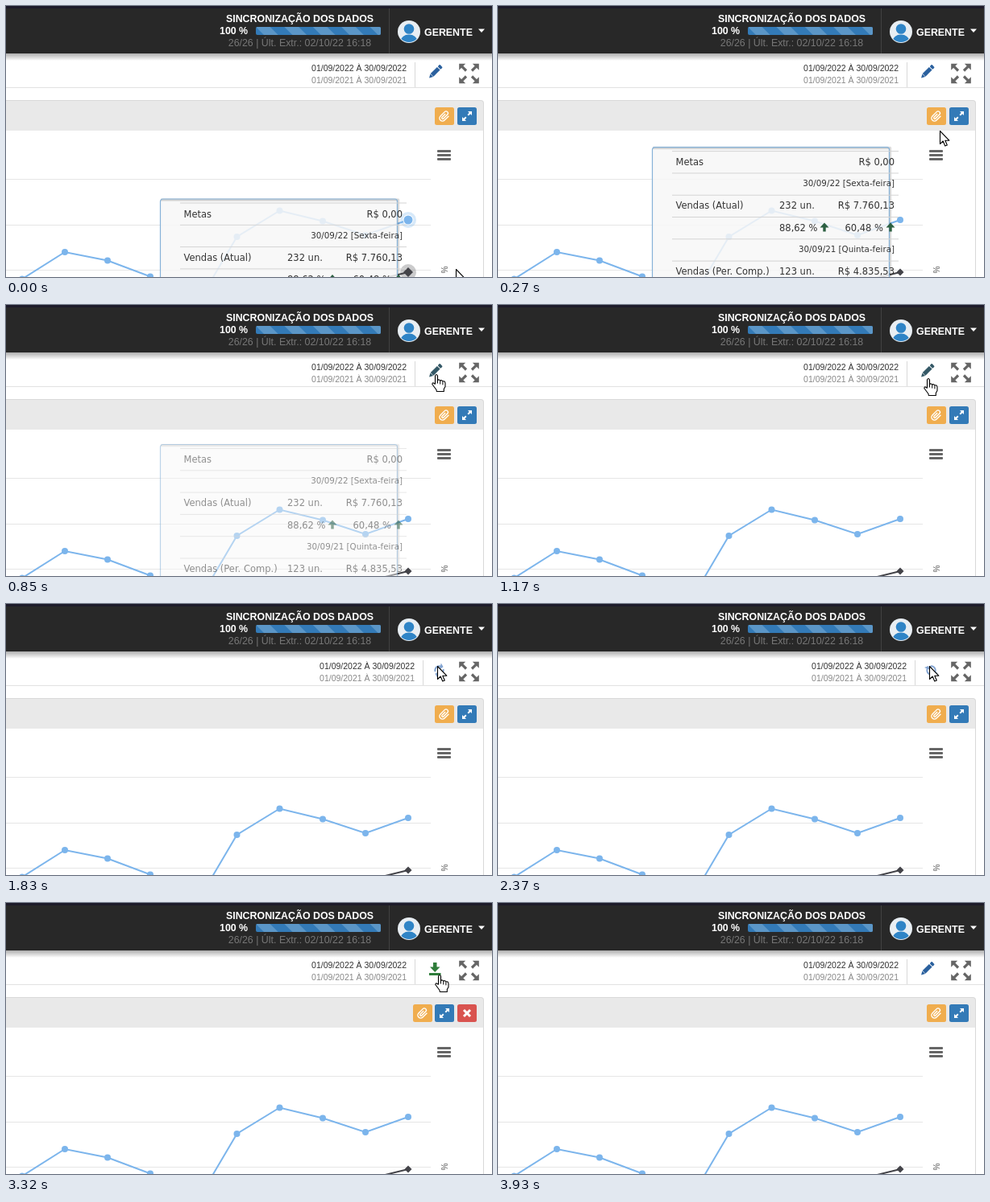
An HTML page with a canvas that plays this animation: 603x337 px, repeating every 4.48 s.

```html
<!DOCTYPE html>
<html lang="pt">
<head>
<meta charset="utf-8">
<style>
html, body { margin: 0; width: 100%; height: 100%; overflow: hidden; background: #fff; }
canvas { display: block; }
</style>
</head>
<body>
<canvas id="stage" width="603" height="337"></canvas>
<script>
const ctx = document.getElementById('stage').getContext('2d');
const LOOP = 4480;
const ARIAL = '"Liberation Sans", Arial, sans-serif';
const DEJAVU = '"DejaVu Sans", sans-serif';
const BLUE = '#7cb5ec', DARK = '#434348';

const CURSOR_PATH = [
  [70, 558, 327], [270, 548, 155], [520, 534, 87], [850, 534, 86],
  [1110, 534, 91], [1430, 534, 91], [1500, 535, 77], [2710, 535, 77],
  [2800, 538, 81], [2970, 538, 81], [3300, 538, 89]
];
const SALES = [[20, 339.5], [73, 306], [126, 316.5], [179, 336.5], [233, 378],
  [286.5, 287], [339.5, 254.5], [393, 267.5], [446, 285], [499, 266]];

const clamp = v => Math.max(0, Math.min(1, v));
const progress = (t, from, to) => clamp((t - from) / (to - from));
const between = (t, a, b) => t >= a && t < b;
const mix = (a, b, k) => `rgb(${a.map((v, i) => Math.round(v + (b[i] - v) * k))})`;

function rect(x, y, w, h, color) {
  ctx.fillStyle = color;
  ctx.fillRect(x, y, w, h);
}

function rounded(x, y, w, h, r, color) {
  ctx.fillStyle = color;
  ctx.beginPath();
  ctx.roundRect(x, y, w, h, r);
  ctx.fill();
}

function text(str, x, y, size, color, { family = ARIAL, weight = 400, align = 'left' } = {}) {
  ctx.font = `${weight} ${size}px ${family}`;
  ctx.textAlign = align;
  ctx.fillStyle = color;
  ctx.fillText(str, x, y);
}

function trace(points, close) {
  ctx.beginPath();
  points.forEach(([x, y]) => ctx.lineTo(x, y));
  if (close) ctx.closePath();
}

function polygon(points, color) {
  trace(points, true);
  ctx.fillStyle = color;
  ctx.fill();
}

function polyline(points, color, width) {
  trace(points, false);
  ctx.strokeStyle = color;
  ctx.lineWidth = width;
  ctx.stroke();
}

function disc(x, y, r, color) {
  ctx.fillStyle = color;
  ctx.beginPath();
  ctx.arc(x, y, r, 0, 7);
  ctx.fill();
}

function at(x, y, angle, draw) {
  ctx.save();
  ctx.translate(x, y);
  ctx.rotate(angle);
  draw();
  ctx.restore();
}

// Arrow from near the centre to the corner lying in direction (dx, dy)
function cornerArrow(cx, cy, dx, dy, gap, size, head, width, color) {
  const p = (a, b) => [cx + dx * a, cy + dy * b];
  polyline([p(gap, gap), p(size - head / 3, size - head / 3)], color, width);
  polygon([p(size, size), p(size - head, size), p(size, size - head)], color);
}

function header() {
  rect(0, 0, 603, 59, '#282828');
  rect(0, 0, 603, 3, '#1d1b2a');
  const shade = ctx.createLinearGradient(0, 59, 0, 68);
  shade.addColorStop(0, 'rgba(0,0,0,.32)');
  shade.addColorStop(1, 'rgba(0,0,0,0)');
  rect(0, 59, 603, 9, shade);
  rect(475, 3, 1, 56, '#414141');

  text('SINCRONIZAÇÃO DOS DADOS', 364.5, 20, 12.4, '#fff', { weight: 700, align: 'center' });
  text('100 %', 265, 35, 12.4, '#fff', { weight: 700 });
  text('26/26 | Últ. Extr.: 02/10/22 16:18', 364.5, 50, 12.4, '#777', { align: 'center' });

  ctx.save();
  ctx.beginPath();
  ctx.roundRect(310, 26, 155, 10, 2);
  ctx.clip();
  rect(310, 26, 155, 10, '#337ab7');
  for (let x = 310; x < 470; x += 35.4) {
    polygon([[x, 26], [x + 17.7, 26], [x + 27.7, 36], [x + 10, 36]], '#5b96c7');
  }
  ctx.restore();

  ctx.save();
  disc(500, 32, 14, '#e8eef3');
  ctx.beginPath();
  ctx.arc(500, 32, 13, 0, 7);
  ctx.clip();
  disc(500, 28.5, 6.3, '#2f84c6');
  ctx.beginPath();
  ctx.ellipse(500, 44, 10.5, 8.5, 0, 0, 7);
  ctx.fill();
  ctx.restore();
  text('GERENTE', 519, 37, 12.4, '#fff', { weight: 700 });
  polygon([[586, 28.5], [594, 28.5], [590, 33]], '#fff');
}

function pencil(color) {
  at(532.5, 82, -Math.PI / 4, () => {
    rect(-5.5, -2.6, 11.5, 5.2, color);
    polygon([[-6, -2.6], [-10.5, 0], [-6, 2.6]], color);
    rounded(7, -2.6, 3.6, 5.2, 1, color);
  });
}

function download(k) {
  rect(530, 74, 4.5, 6, mix([112, 70, 50], [47, 125, 59], k));
  polygon([[526, 79.5], [538.5, 79.5], [532.2, 86]], mix([70, 95, 55], [47, 125, 59], k));
  rect(525, 87, 14.5, 3, '#2f7d3b');
}

function spinner(t) {
  at(537.5, 82.5, t / 2000 * Math.PI * 2, () => {
    for (const turn of [0, Math.PI]) at(0, 0, turn, () => {
      ctx.strokeStyle = '#84a5d2';
      ctx.lineWidth = 2;
      ctx.beginPath();
      ctx.arc(0, 0, 5.2, Math.PI * 1.08, Math.PI * 1.8);
      ctx.stroke();
      polygon([[6.5, -6.5], [6.5, -1], [1, -1]], '#84a5d2');
    });
  });
}

function toolbar(t, loading, editing) {
  const right = loading ? 507 : 497;
  text('01/09/2022 À 30/09/2022', right, 81, 10.5, '#333', { align: 'right' });
  text('01/09/2021 À 30/09/2021', right, 96, 10.5, '#888', { align: 'right' });
  rect(right + 10, 70, 1, 31, '#d8d8d8');
  rect(0, 101, 603, 1, '#e2e2e2');

  if (loading) spinner(t);
  else if (editing) download(progress(t, 2830, 3200));
  else pencil(mix([42, 96, 158], [52, 88, 102], t < 1700 ? progress(t, 520, 850) : 0));

  for (const dx of [-1, 1]) for (const dy of [-1, 1]) {
    cornerArrow(574.5, 84, dx, dy, 3.5, 12.3, 8, 3.2, '#666');
  }
}

function button(x, color, icon) {
  rounded(x, 126, 24, 22, 2.5, color);
  icon(x + 12, 137);
}

function clipIcon(x, y) {
  at(x, y, -Math.PI / 4, () => {
    ctx.strokeStyle = '#fff';
    ctx.lineWidth = 1.4;
    ctx.beginPath();
    ctx.moveTo(4, 3.6);
    ctx.lineTo(-3.5, 3.6);
    ctx.arc(-3.5, 0, 3.6, Math.PI / 2, Math.PI * 1.5);
    ctx.lineTo(4, -3.6);
    ctx.arc(4, -1.2, 2.4, -Math.PI / 2, Math.PI / 2);
    ctx.lineTo(-3, 1.2);
    ctx.arc(-3, 0, 1.2, Math.PI / 2, Math.PI * 1.5);
    ctx.lineTo(3, -1.2);
    ctx.stroke();
  });
}

function expandIcon(x, y) {
  cornerArrow(x, y, 1, -1, 1.2, 6, 5, 2, '#fff');
  cornerArrow(x, y, -1, 1, 1.2, 6, 5, 2, '#fff');
}

function crossIcon(x, y) {
  polyline([[x - 4, y - 4], [x + 4, y + 4]], '#fff', 3);
  polyline([[x - 4, y + 4], [x + 4, y - 4]], '#fff', 3);
}

function panel(closable) {
  rounded(-10, 117, 603, 240, 4, '#d9d9d9');
  rounded(-10, 118, 602, 240, 3, '#e9e9e9');
  rect(0, 155, 592, 182, '#fff');
  const x = closable ? 505 : 532;
  button(x, '#f0ad4e', clipIcon);
  button(closable ? 532 : 560, '#337ab7', expandIcon);
  if (closable) button(560, '#d9534f', crossIcon);
}

function diamond(x, y, r) {
  polygon([[x, y - r], [x + r, y], [x, y + r], [x - r, y]], DARK);
}

function chart(hover) {
  for (const y of [215, 272, 328]) rect(0, y, 527, 1, '#e6e6e6');
  for (const y of [179, 184, 189]) rounded(535, y, 17, 3, 1, '#666');
  at(540, 328, Math.PI / 2, () => text('%', 0, 0, 10, '#555', { align: 'center' }));

  polyline([[446, 344], [499, 331]], DARK, 2);
  polyline(SALES, BLUE, 2);
  SALES.forEach(([x, y]) => disc(x, y, 4, BLUE));
  diamond(499, 331, 4.5);
  if (!hover) return;
  ctx.globalAlpha = hover;
  disc(499, 266, 10, 'rgba(124,181,236,.3)');
  disc(499, 331, 10, 'rgba(67,67,72,.28)');
  disc(499, 266, 6.5, '#fff');
  disc(499, 266, 5.5, BLUE);
  diamond(499, 331, 6);
  ctx.globalAlpha = 1;
}

function upArrow(x, y) {
  polygon([[x, y - 5.5], [x + 5.5, y + 0.5], [x + 1.7, y + 0.5], [x + 1.7, y + 5.5],
    [x - 1.7, y + 5.5], [x - 1.7, y + 0.5], [x - 5.5, y + 0.5]], '#2d6042');
}

function tooltip(top, alpha) {
  if (alpha <= 0) return;
  ctx.save();
  ctx.globalAlpha = alpha;
  ctx.translate(0, top);
  rounded(191.5, 0, 294, 230, 3, 'rgba(247,247,247,.86)');
  ctx.lineJoin = 'round';
  for (const [width, color] of [[4, 'rgba(0,0,0,.06)'], [2.5, 'rgba(0,0,0,.1)']]) {
    polyline([[192, 1], [486.5, 1], [486.5, 230]], color, width);
  }
  ctx.strokeStyle = '#86b2d8';
  ctx.lineWidth = 1.2;
  ctx.beginPath();
  ctx.roundRect(191.5, 0, 294, 230, 3);
  ctx.stroke();

  for (let i = 0; i < 6; i++) rect(216, 4.5 + i * 27.3, 281, 1, '#d4d4d4');
  const label = (str, y) => text(str, 220.5, y, 11.5, '#333', { family: DEJAVU });
  const units = (str, y) => text(str, 349, y, 11.5, '#333', { family: DEJAVU });
  const value = (str, y, x = 492) => text(str, x, y, 11.5, '#333', { family: DEJAVU, align: 'right' });
  const day = (str, y) => text(str, 492, y, 10.3, '#333', { family: DEJAVU, align: 'right' });
  label('Metas', 22.5);
  value('R$ 0,00', 22.5);
  day('30/09/22 [Sexta-feira]', 48.5);
  label('Vendas (Atual)', 76.5);
  units('232 un.', 76.5);
  value('R$ 7.760,13', 76.5);
  units('88,62 %', 104);
  upArrow(405, 99.5);
  value('60,48 %', 104, 478);
  upArrow(487, 99.5);
  day('30/09/21 [Quinta-feira]', 130.5);
  label('Vendas (Per. Comp.)', 158);
  units('123 un.', 158);
  value('R$ 4.835,53', 158);
  ctx.restore();
}

function cursorPosition(t) {
  const next = CURSOR_PATH.findIndex(key => key[0] > t);
  if (next === 0) return CURSOR_PATH[0].slice(1);
  if (next < 0) return CURSOR_PATH[CURSOR_PATH.length - 1].slice(1);
  const [t0, x0, y0] = CURSOR_PATH[next - 1], [t1, x1, y1] = CURSOR_PATH[next];
  const k = progress(t, t0, t1);
  return [x0 + (x1 - x0) * k, y0 + (y1 - y0) * k];
}

function outlined(draw) {
  draw();
  ctx.fillStyle = '#fff';
  ctx.strokeStyle = '#000';
  ctx.lineWidth = 1.1;
  ctx.lineJoin = 'round';
  ctx.fill();
  ctx.stroke();
}

function arrowCursor() {
  outlined(() => trace([[0.5, 0.5], [0.5, 16.5], [4.2, 13], [6.7, 19], [9.3, 18],
    [6.8, 12.2], [11.8, 12.2]], true));
}

function handCursor() {
  outlined(() => {
    ctx.beginPath();
    ctx.moveTo(-1.5, 12.5);
    ctx.lineTo(-1.5, 2);
    ctx.quadraticCurveTo(0, -1, 1.5, 2);
    ctx.lineTo(1.5, 7.5);
    ctx.quadraticCurveTo(3.5, 6, 4.7, 8.2);
    ctx.quadraticCurveTo(6.8, 6.8, 7.9, 9);
    ctx.quadraticCurveTo(10.5, 8, 11, 11);
    ctx.lineTo(11, 15.5);
    ctx.lineTo(9.3, 18.5);
    ctx.lineTo(9.3, 21.5);
    ctx.lineTo(0.3, 21.5);
    ctx.lineTo(0, 19.5);
    ctx.lineTo(-5.2, 12.5);
    ctx.quadraticCurveTo(-4.8, 9.3, -1.5, 12.5);
  });
  for (const [x, y] of [[1.5, 7.5], [4.7, 8.5], [7.9, 9.3]]) {
    polyline([[x, y], [x, y + 4]], '#000', 1);
  }
}

function render(t) {
  const loading = between(t, 1700, 2700) || between(t, 3590, 3860);
  const editing = between(t, 2700, 3860);
  rect(0, 0, 603, 337, '#fff');
  header();
  toolbar(t, loading, editing);
  panel(between(t, 2770, 3860));
  chart(1 - progress(t, 70, 260));
  const lift = Math.exp(-Math.max(0, t - 70) / 58);
  tooltip(173.5 + 66.5 * lift, 1 - progress(t, 630, 1110));
  if (t >= 3925) return;
  const hand = between(t, 470, 1700) || between(t, 2770, 3590);
  at(...cursorPosition(t), 0, hand ? handCursor : arrowCursor);
}

let start;
function frame(now) {
  start ??= now;
  render((now - start) % LOOP);
  requestAnimationFrame(frame);
}
render(0);
requestAnimationFrame(frame);
</script>
</body>
</html>
```
